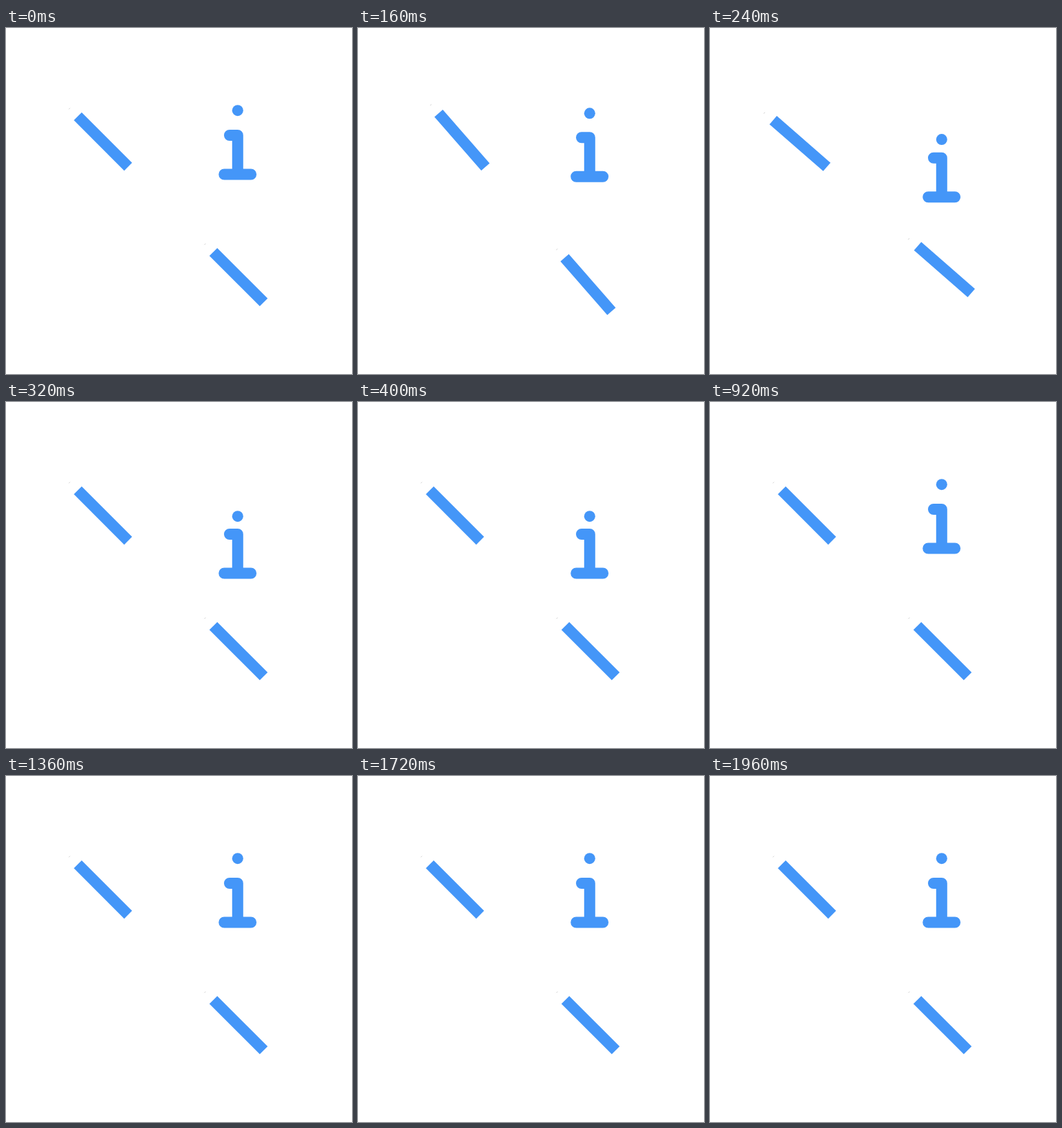
An HTML page for the animation above (2 s loop, 500x500 px).

```html
<!DOCTYPE html>
<html lang="en">
<head>
<meta charset="utf-8">
<title>Info loop</title>
<style>
  html, body { margin: 0; width: 100%; height: 100%; overflow: hidden; background: #fff; }
  svg { display: block; width: 100%; height: 100%; }
</style>
</head>
<body>
<svg viewBox="0 0 500 500" fill="none" stroke="#4496f8" stroke-width="16">
  <defs>
    <g id="bar">
      <path d="M-36.4-36.4 36.4 36.4"/>
      <path d="M-49.2-46.8l1.6-1.6" stroke="#999" stroke-width=".5"/>
    </g>
  </defs>
  <g id="bars">
    <use href="#bar" x="140.1" y="164.1"/>
    <use href="#bar" x="336" y="360"/>
  </g>
  <circle id="dot" cx="334.8" cy="119.2" r="8" fill="#4496f8" stroke="none"/>
  <path id="stem" d="M323 155H334.8V211.5M315.3 211.5H354" stroke-linecap="round" stroke-linejoin="round"/>
</svg>
<script>
const LOOP = 2000, STEP = 40;
const SHAKE = 4, BEAT = 200 / 3;
const PIVOT = "177 313";
const $ = id => document.getElementById(id);
const bars = $("bars"), dot = $("dot"), stem = $("stem");

const clamp = p => Math.min(1, Math.max(0, p));
const soft = p => (1 - Math.cos(Math.PI * clamp(p))) / 2;

// Steep ease in and out
function steep(p) {
  p = clamp(p);
  return p < .5 ? .5 * (2 * p) ** 3.35 : 1 - .5 * (2 - 2 * p) ** 3.35;
}

// One swing: rest, clockwise, counterclockwise, rest
function swing(t) {
  const b = t / BEAT;
  return SHAKE * (soft(b) - 2 * soft(b - 1) + soft(b - 2));
}

function draw(t) {
  const angle = swing(t - 100) + swing(t - 400);
  const drop = steep((t - 100) / 200) - steep((t - 400) / 200);
  bars.setAttribute("transform", `rotate(${angle} ${PIVOT})`);
  dot.setAttribute("transform", `translate(0 ${46 * drop})`);
  stem.setAttribute("transform", `translate(0 ${36 * drop})`);
}

const start = performance.now();
function tick() {
  const t = (performance.now() - start) % LOOP;
  draw(Math.floor(t / STEP) * STEP);
  requestAnimationFrame(tick);
}
tick();
</script>
</body>
</html>
```
